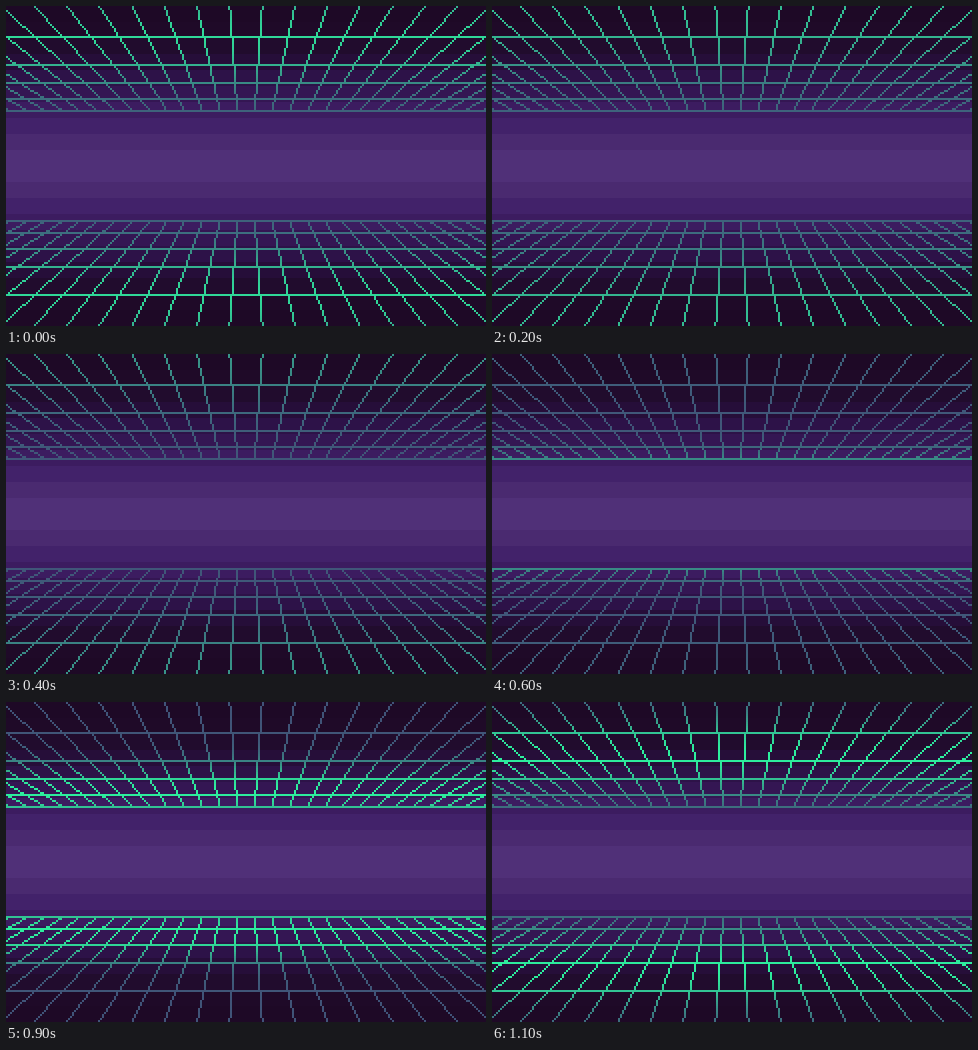
Write an HTML page with a canvas that moves like this. It is 480 by 320 pixels and loops after 1200 ms.

```html
<!DOCTYPE html>
<html lang="en">
<head>
<meta charset="utf-8">
<title>Neon grid pulse</title>
<style>
  html, body { margin: 0; width: 100%; height: 100%; overflow: hidden; background: #1e0826; }
  canvas { display: block; width: 480px; height: 320px; image-rendering: pixelated; }
</style>
</head>
<body>
<canvas id="stage" width="240" height="160"></canvas>
<script>
const WIDTH = 240, HEIGHT = 160, HORIZON = 52;
const STEP_MS = 100, STEPS = 12;
const ROWS = [15, 29, 38, 46, 52];
const BANDS = ['#1e0926', '#1f0a28', '#210c2d', '#260e39', '#2d1248',
               '#341653', '#3c1c60', '#42226a', '#4a2a70', '#503078'];
const DIM = [64, 84, 120], BRIGHT = [45, 240, 158];

// Pulse keys: step, centre (stage y), strength, spread
const KEYS = [
  [5, 126, 0.25, 22], [6, 120, 0.55, 22], [8, 108, 1, 24],
  [10, 70, 1, 31], [11, 53, 1, 39], [12, 30, 0.85, 50],
  [14, 10, 0.68, 68], [16, -5, 0.42, 60], [18, -12, 0.1, 60], [19, -15, 0, 60]
];

const ctx = document.getElementById('stage').getContext('2d');

function pulseAt(step) {
  const i = KEYS.findIndex(key => key[0] >= step);
  if (i < 0 || step < KEYS[0][0]) return null;
  if (i === 0) return KEYS[0].slice(1);
  const a = KEYS[i - 1], b = KEYS[i];
  const u = (step - a[0]) / (b[0] - a[0]);
  return a.slice(1).map((v, n) => v + (b[n + 1] - v) * u);
}

function lineColor(row, pulses) {
  const y = row * 2 + 1;
  let glow = 0;
  for (const [centre, strength, spread] of pulses) {
    glow += strength * Math.exp(-(((y - centre) / spread) ** 2));
  }
  glow = Math.min(1, glow);
  return `rgb(${DIM.map((v, n) => Math.round(v + (BRIGHT[n] - v) * glow))})`;
}

// Fills a run and its reflections across both axes
function mirrored(x, y, w, h) {
  for (const left of [x, WIDTH - x - w]) {
    ctx.fillRect(left, y, w, h);
    ctx.fillRect(left, HEIGHT - y - h, w, h);
  }
}

const column = (k, y) => Math.floor(WIDTH / 2 - (k + 0.5) * (16.25 - 7.5 * y / HORIZON));

function draw(step) {
  BANDS.forEach((color, i) => {
    ctx.fillStyle = color;
    mirrored(0, i * 8, WIDTH, 8);
  });
  const pulses = [pulseAt(step), pulseAt(step + STEPS)].filter(Boolean);
  for (let y = 0; y <= HORIZON; y++) {
    ctx.fillStyle = lineColor(y, pulses);
    if (ROWS.includes(y)) mirrored(0, y, WIDTH, 1);
    for (let k = 0; k < 14; k++) {
      const x = column(k, y);
      mirrored(x, y, Math.max(1, column(k, y + 1) - x), 1);
    }
  }
}

const start = performance.now();
function tick() {
  const elapsed = performance.now() - start;
  draw(Math.floor(elapsed / STEP_MS) % STEPS);
  requestAnimationFrame(tick);
}
tick();
</script>
</body>
</html>
```
